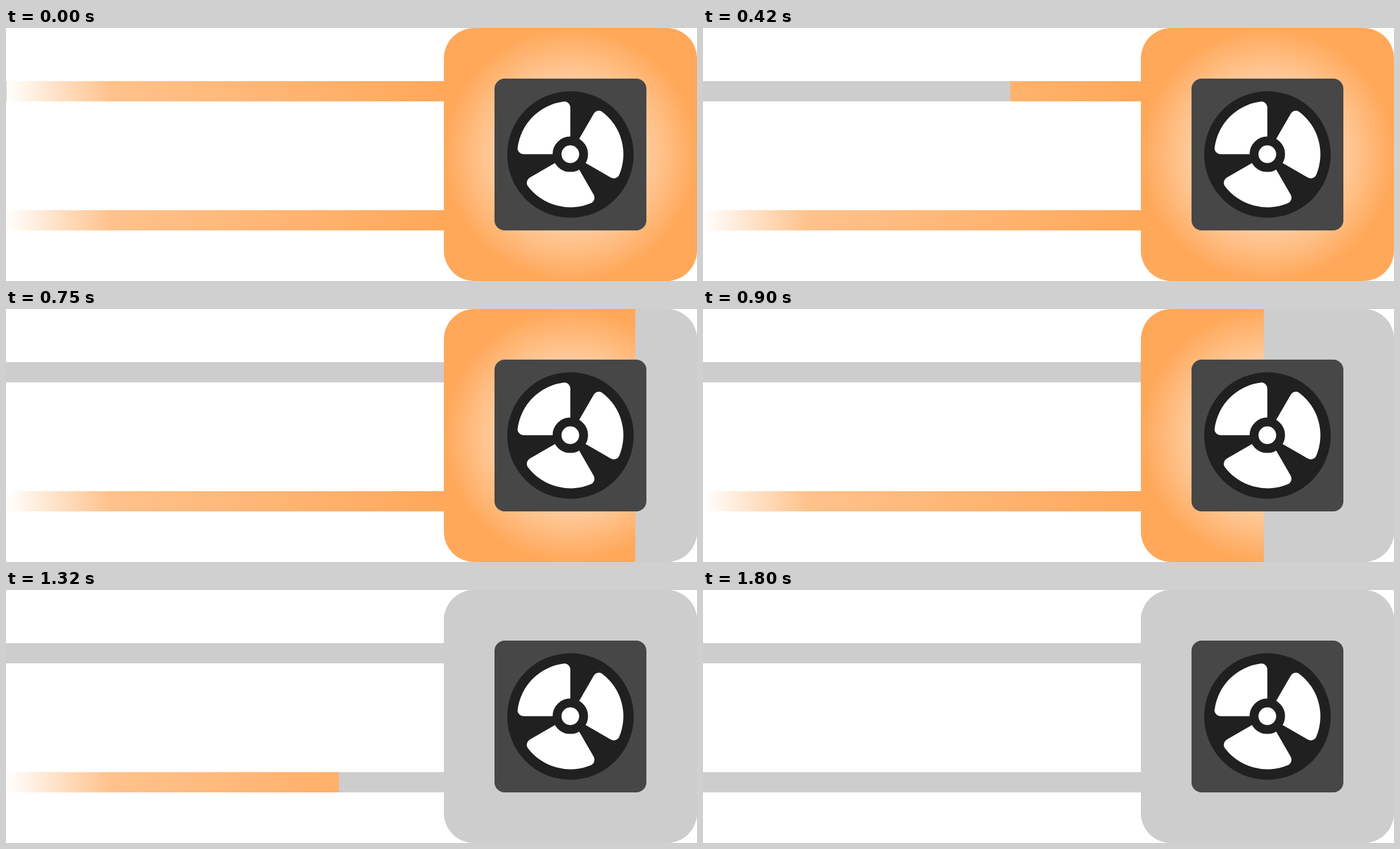
These frames come from a looping animation (1092 by 400 pixels, 1.83 s). An HTML page:

```html
<!DOCTYPE html>
<html lang="en">
<head>
<meta charset="utf-8">
<title>Fan cooling loop</title>
<style>
  html, body { margin: 0; width: 100%; height: 100%; overflow: hidden; background: #fff; }
  svg { display: block; width: 1092px; height: 400px; }

  .cool {
    fill: #cdcdcd;
    transform-box: fill-box;
    transform-origin: right;
    animation: 1830ms linear infinite both;
  }
  .intake { transform-origin: left; animation-name: intake; }
  .core { animation-name: core; }
  .outlet { animation-name: outlet; }

  /* 0–600 ms, 616–1170 ms, 1170–1800 ms */
  @keyframes intake {
    0% { transform: scaleX(0); }
    32.787%, 100% { transform: scaleX(1); }
  }
  @keyframes core {
    0%, 33.661% { transform: scaleX(0); }
    63.934%, 100% { transform: scaleX(1); }
  }
  @keyframes outlet {
    0%, 63.934% { transform: scaleX(0); }
    98.361%, 100% { transform: scaleX(1); }
  }
</style>
</head>
<body>
<svg viewBox="0 0 1092 400">
  <defs>
    <linearGradient id="pipe">
      <stop offset="0" stop-color="#fff"/>
      <stop offset=".24" stop-color="#ffc28c"/>
      <stop offset="1" stop-color="#ffa85a"/>
    </linearGradient>
    <radialGradient id="glow">
      <stop offset="0" stop-color="#fff"/>
      <stop offset="1" stop-color="#ffa85a"/>
    </radialGradient>
    <clipPath id="body"><rect x="692" width="400" height="400" rx="48"/></clipPath>
    <path id="blade" d="M0 0V-73.5C0-79-4.5-83.9-10-83.3A84 84 0 0 0-83.3-10C-83.9-4.5-79 0-73.5 0Z"/>
  </defs>

  <rect y="84" width="692" height="32" fill="url(#pipe)"/>
  <rect class="cool intake" y="84" width="692" height="32"/>
  <rect y="288" width="692" height="32" fill="url(#pipe)"/>
  <rect class="cool outlet" y="288" width="692" height="32"/>

  <g clip-path="url(#body)">
    <rect x="692" width="400" height="400" fill="url(#glow)"/>
    <rect class="cool core" x="692" width="400" height="400"/>
  </g>

  <rect x="772" y="80" width="240" height="240" rx="16" fill="#474747"/>
  <g transform="translate(892 200)" fill="#fff">
    <circle r="100" fill="#202020"/>
    <g transform="translate(-.2 -.4)">
      <use href="#blade"/>
      <use href="#blade" transform="rotate(120)"/>
      <use href="#blade" transform="rotate(240)"/>
      <circle r="21" stroke="#202020" stroke-width="14"/>
    </g>
  </g>
</svg>
</body>
</html>
```
